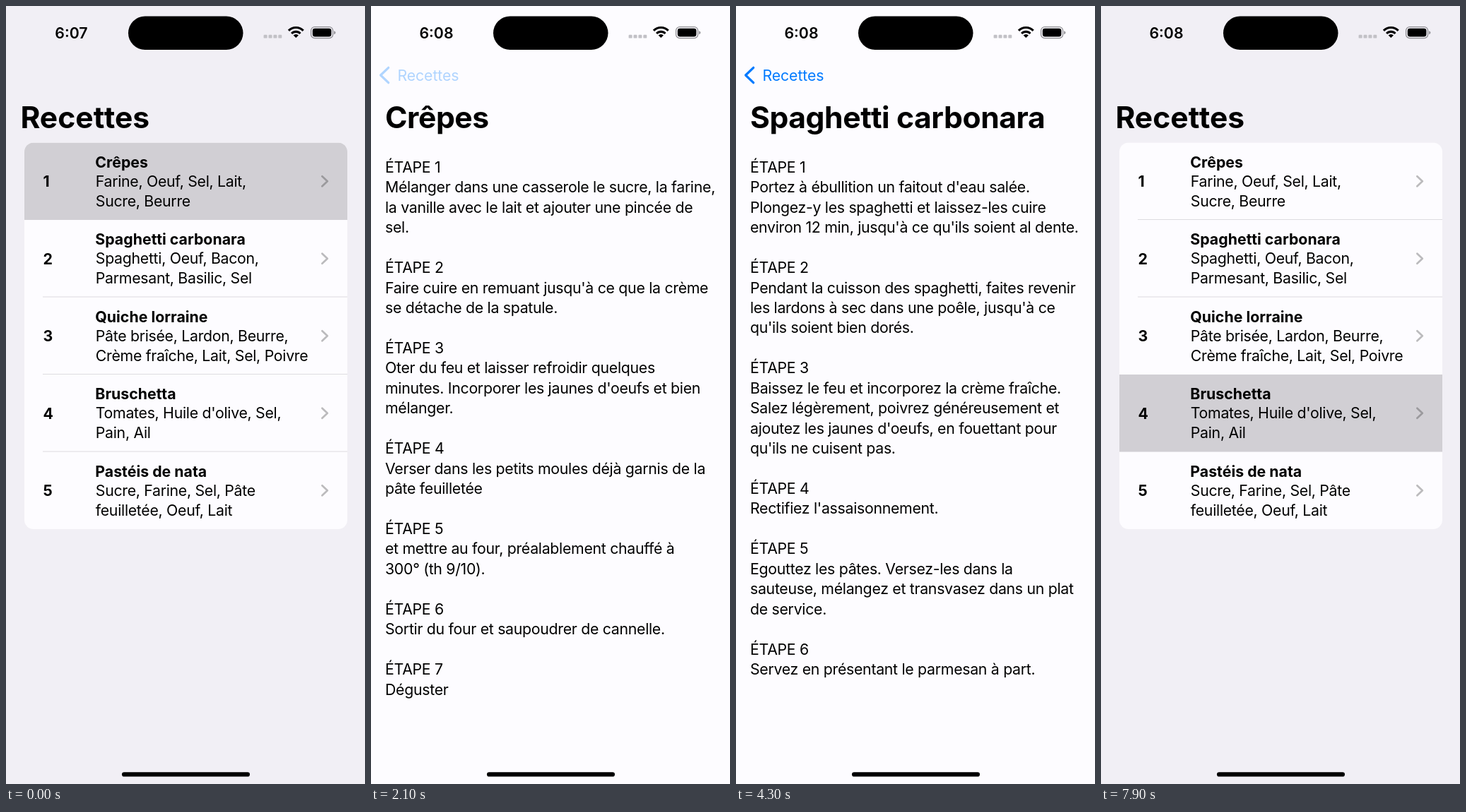
These frames come from a looping animation (508x1102 px, 8000 ms). An HTML page:

```html
<!DOCTYPE html>
<html lang="fr">
<head>
<meta charset="utf-8">
<title>Recettes</title>
<style>
html, body { margin: 0; width: 100%; height: 100%; overflow: hidden; background: #f1eff5; }
svg { display: block; width: 508px; height: 1102px; font-family: Inter, sans-serif; }
.body { font-size: 21.3px; letter-spacing: -.3px; }
.head { font-size: 21.3px; font-weight: 700; }
.large { font-size: 42.6px; font-weight: 700; }
#titles .large { letter-spacing: -.4px; }
#back { letter-spacing: -.1px; }
#clock { font-weight: 600; }
</style>
</head>
<body>
<svg id="stage" viewBox="0 0 508 1102" xmlns="http://www.w3.org/2000/svg">
  <defs><clipPath id="card"><rect x="26" y="193.5" width="457" height="547.5" rx="13"/></clipPath></defs>
  <g id="list"><rect x="-10" width="700" height="1102" fill="#f1eff5"/></g>
  <rect id="dim" width="508" height="1102"/>
  <g id="detail"><rect width="508" height="1102" fill="#fdfcff"/></g>
  <g id="titles"></g>
  <path id="chevron" d="M24.7 87.3L13.6 98L24.7 108.7" fill="none" stroke="#007aff" stroke-width="3.2" stroke-linecap="round" stroke-linejoin="round"/>
  <text id="back" class="body" fill="#007aff">Recettes</text>
  <text id="home" class="large">Recettes</text>
  <g id="status">
    <text id="clock" class="head" x="92.5" y="46" text-anchor="middle"></text>
    <rect x="173" y="14.5" width="162.5" height="47.5" rx="23.75"/>
    <g id="dots" fill="#c2c1c6"></g>
    <g id="wifi" fill="none" stroke="#000" stroke-width="3.2"></g>
    <rect x="431.6" y="29.6" width="31" height="16" rx="5.2" fill="none" stroke="#8f8e93" stroke-width="1.3"/>
    <rect x="433.8" y="31.8" width="26.6" height="11.6" rx="3.4"/>
    <path d="M464.2 35.2q2.2 .8 2.2 2.5t-2.2 2.5z" fill="#8f8e93"/>
    <rect x="164" y="1085.3" width="181" height="6.2" rx="3.1"/>
  </g>
</svg>
<script>
const $ = id => document.getElementById(id);
const LOOP = 8000, STEP = 100, W = 508, ROW = 109.5, TOP = 193.5, LINE = 28.45;

const recipes = [
  ["Crêpes", "Farine, Oeuf, Sel, Lait,", "Sucre, Beurre"],
  ["Spaghetti carbonara", "Spaghetti, Oeuf, Bacon,", "Parmesant, Basilic, Sel"],
  ["Quiche lorraine", "Pâte brisée, Lardon, Beurre,", "Crème fraîche, Lait, Sel, Poivre"],
  ["Bruschetta", "Tomates, Huile d'olive, Sel,", "Pain, Ail"],
  ["Pastéis de nata", "Sucre, Farine, Sel, Pâte", "feuilletée, Oeuf, Lait"]
];

const steps = [[
  "Mélanger dans une casserole le sucre, la farine,|la vanille avec le lait et ajouter une pincée de|sel.",
  "Faire cuire en remuant jusqu'à ce que la crème|se détache de la spatule.",
  "Oter du feu et laisser refroidir quelques|minutes. Incorporer les jaunes d'oeufs et bien|mélanger.",
  "Verser dans les petits moules déjà garnis de la|pâte feuilletée",
  "et mettre au four, préalablement chauffé à|300° (th 9/10).",
  "Sortir du four et saupoudrer de cannelle.",
  "Déguster"
], [
  "Portez à ébullition un faitout d'eau salée.|Plongez-y les spaghetti et laissez-les cuire|environ 12 min, jusqu'à ce qu'ils soient al dente.",
  "Pendant la cuisson des spaghetti, faites revenir|les lardons à sec dans une poêle, jusqu'à ce|qu'ils soient bien dorés.",
  "Baissez le feu et incorporez la crème fraîche.|Salez légèrement, poivrez généreusement et|ajoutez les jaunes d'oeufs, en fouettant pour|qu'ils ne cuisent pas.",
  "Rectifiez l'assaisonnement.",
  "Egouttez les pâtes. Versez-les dans la|sauteuse, mélangez et transvasez dans un plat|de service.",
  "Servez en présentant le parmesan à part."
]];

function add(parent, tag, attrs, text) {
  const el = document.createElementNS("http://www.w3.org/2000/svg", tag);
  for (const k in attrs) el.setAttribute(k, attrs[k]);
  if (text) el.textContent = text;
  return parent.appendChild(el);
}
const label = (parent, cls, x, y, text) => add(parent, "text", { class: cls, x, y }, text);
const set = (el, name, v) => el.setAttribute(name, v);
const move = (el, x, y, k) => set(el, "transform", `translate(${x} ${y}) scale(${k})`);
const fade = (el, v) => set(el, "opacity", Math.max(0, Math.min(1, v)));

// Recipe list
const card = add($("list"), "g", { "clip-path": "url(#card)" });
add(card, "rect", { x: 26, y: TOP, width: 457, height: ROW * 5, fill: "#fdfcff" });
const marks = [], rules = [];
recipes.forEach(([name, a, b], i) => {
  const y = TOP + i * ROW;
  marks.push(add(card, "rect", { x: 26, y, width: 457, height: ROW, fill: "#d1cfd4" }));
  label(card, "head", 52.4, y + 62.5, i + 1);
  label(card, "head", 126.3, y + 35.3, name);
  label(card, "body", 126.8, y + 62, a);
  label(card, "body", 126.8, y + 90.4, b);
  add(card, "path", { d: `M447.4 ${y + 47.8}l7.4 7l-7.4 7`, fill: "none", stroke: "#000", "stroke-opacity": .26,
    "stroke-width": 2.7, "stroke-linecap": "round", "stroke-linejoin": "round" });
});
for (let i = 1; i < 5; i++)
  rules.push(add(card, "rect", { x: 52, y: TOP + i * ROW - 1, width: 431, height: 1, fill: "#dddce0" }));

// Recipe pages
const pages = steps.map((list, p) => {
  const body = add($("detail"), "g", {});
  let n = 0;
  const line = s => label(body, "body", 20, 235.8 + LINE * n++, s);
  list.forEach((s, i) => {
    line("ÉTAPE " + (i + 1));
    s.split("|").forEach(line);
    n++;
  });
  return { body, title: label($("titles"), "large", 0, 173.3, recipes[p][0]) };
});

// Status icons
for (let i = 0; i < 4; i++)
  add($("dots"), "rect", { x: 364.6 + i * 6.9, y: 40.8, width: 5, height: 4.8, rx: 1.2 });
for (const r of [2.6, 8.6, 14.4]) {
  const h = r * .72;
  add($("wifi"), "path", { d: `M${410.3 - h} ${45.2 - h}A${r} ${r} 0 0 1 ${410.3 + h} ${45.2 - h}`, "stroke-width": r < 3 ? 5 : 3.1 });
}

// Critically damped spring, t in ms
function spring(t) {
  const s = Math.max(0, t) * .0185;
  return 1 - (1 + s) * Math.exp(-s);
}

const visits = [
  { row: 0, tap: 0, push: 50, press: 2100, pop: 2239, end: 2800 },
  { row: 1, tap: 3800, push: 3805, press: 5700, pop: 5817, end: 6400 },
  { row: 3, tap: 7900, push: 9e3, press: 9e3, pop: 9e3, end: 9e3 }
];
const LAG = 10.2;

const tints = [[0, 0, 122, 255], [.386, 109, 135, 168], [.768, 47, 61, 80], [1, 0, 0, 0]];
function tint(q) {
  const i = q < tints[1][0] ? 0 : q < tints[2][0] ? 1 : 2;
  const a = tints[i], b = tints[i + 1], k = (q - a[0]) / (b[0] - a[0]);
  return `rgb(${[1, 2, 3].map(c => Math.round(a[c] + (b[c] - a[c]) * k))})`;
}

function draw(time) {
  const v = visits.find(v => time >= v.tap && time < v.end);
  // depth: 0 on the list, 1 on a recipe page
  const depth = t => !v ? 0 : t < v.pop ? spring(t - v.push) : 1 - spring(t - v.pop);
  const snap = d => d < .0015 ? 0 : d > .9985 ? 1 : d;
  const d = snap(depth(time));
  const popping = v && time >= v.pop;
  const q = 1 - snap(popping ? 1 - spring(time - LAG - v.pop) : depth(time - LAG));

  move($("list"), -.3 * W * d, 0, 1);
  set($("dim"), "opacity", .1 * d);
  move($("detail"), W * (1 - d), 0, 1);

  marks.forEach((m, i) => fade(m, v && v.row === i ? (popping ? d : 1) : 0));
  rules.forEach((r, i) => fade(r, v && !popping && (v.row === i || v.row === i + 1) ? 0 : 1));
  pages.forEach((p, i) => {
    const on = v && v.row === i;
    fade(p.body, on ? 1 : 0);
    fade(p.title, on ? 1 - q : 0);
    set(p.title, "x", 19.9 + W * q);
  });

  // The large title and the back label morph into each other
  const k = .478 + .522 * q, y = 106 + 67.3 * q, mix = Math.min(1, q * 2.6);
  const pressed = v && time >= v.press && !popping ? .3 : 1;
  move($("home"), 37.4 - 17 * q, y, k);
  set($("home"), "fill", tint(q));
  fade($("home"), mix);
  move($("back"), 37.4 - 17 * q, y, k / .478);
  fade($("back"), (1 - mix) * pressed);
  fade($("chevron"), (1 - 3 * q) * pressed);

  $("clock").textContent = time < 300 ? "6:07" : "6:08";
}

function tick(now) {
  draw(Math.floor(now % LOOP / STEP) * STEP);
  requestAnimationFrame(tick);
}
draw(0);
requestAnimationFrame(tick);
</script>
</body>
</html>
```
